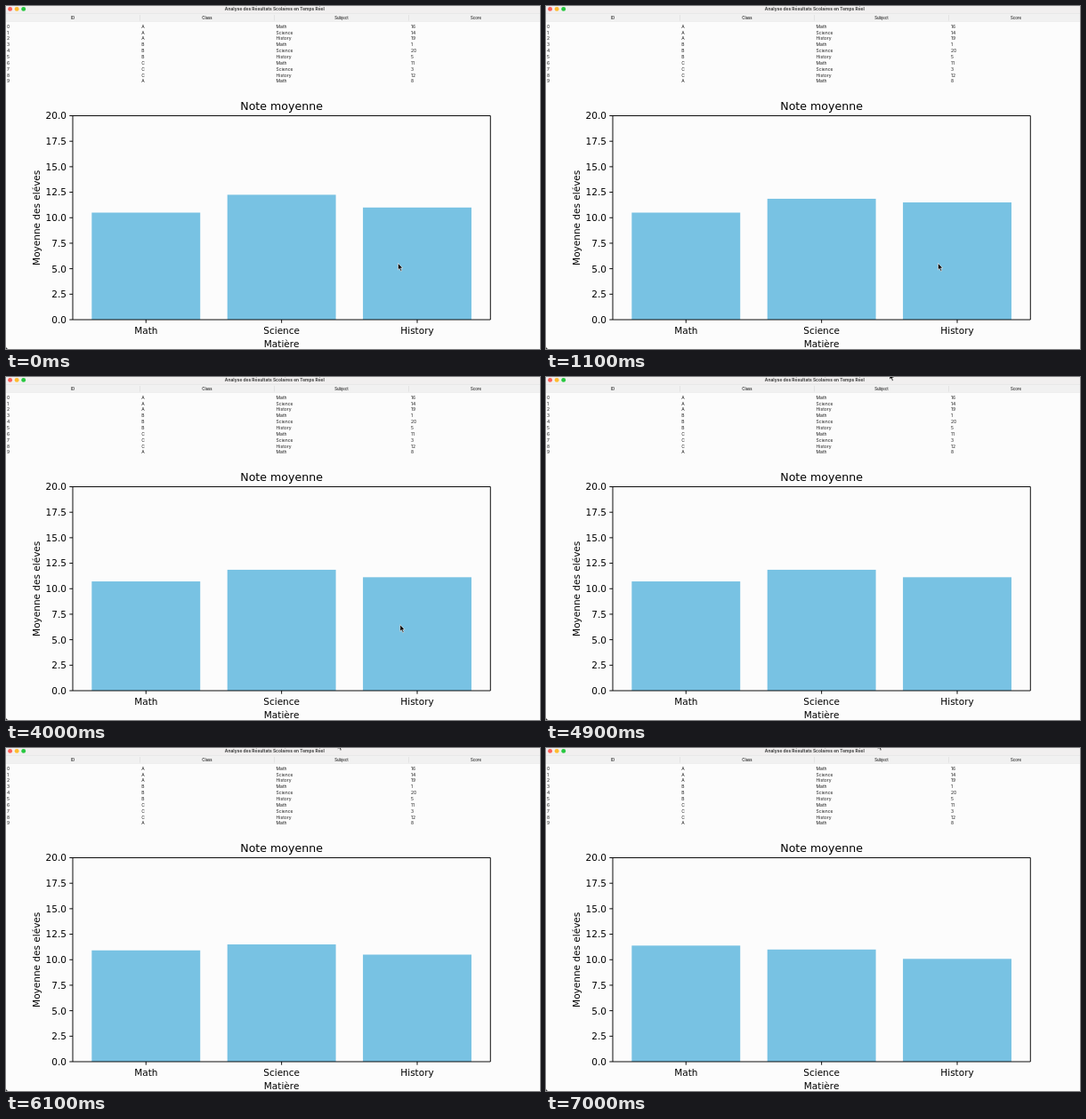
An HTML page for the animation above (7.4 s loop, 600 by 386 pixels).

```html
<!DOCTYPE html>
<html lang="fr">
<head>
<meta charset="utf-8">
<title>Analyse des Résultats Scolaires en Temps Réel</title>
<style>
  html, body { margin: 0; width: 100%; height: 100%; overflow: hidden; background: #fcfcfc; }
  svg { display: block; width: 100%; height: 100%; }
  .ui { font: 5px Inter, sans-serif; fill: #1c1c1c; }
  .head { font-size: 4.3px; font-weight: 500; }
  .title { font-size: 4.9px; font-weight: 700; fill: #404040; }
  .plot { font: 10.5px "DejaVu Sans", sans-serif; fill: #000; }
  .plot-title { font-size: 12.6px; }
  .mid { text-anchor: middle; }
  .end { text-anchor: end; }
  .axis { fill: none; stroke: #000; stroke-width: .95; }
</style>
</head>
<body>
<svg id="stage" viewBox="0 0 600 386"></svg>
<script>
const LOOP = 7400, STEP = 100;
const subjects = ['Math', 'Science', 'History'];
const scores = [16, 14, 19, 1, 20, 5, 11, 3, 12, 8];
const columns = ['ID', 'Class', 'Subject', 'Score'];
const columnWidth = 151;

const plot = { left: 75, right: 544.3, top: 123.5, bottom: 353 };
const unit = (plot.right - plot.left) / 3.08;
const barCentre = i => plot.left + unit * (0.54 + i);
const valueY = v => plot.bottom - v * (plot.bottom - plot.top) / 20;

// Sum and count of the marks per subject when the loop begins
const initial = [[63, 6], [49, 4], [55, 5]];
// New marks: [time, subject index, mark]
const marks = [
  [800, 1, 11], [900, 1, 11], [1000, 2, 14], [1100, 1, 12],
  [1200, 0, 12], [1300, 2, 12], [1400, 2, 8],
  [5400, 0, 12], [5500, 0, 12], [5600, 0, 12], [5700, 0, 11],
  [5800, 1, 9], [5900, 2, 8], [6000, 2, 8], [6100, 0, 9],
  [6200, 2, 5], [6400, 0, 17], [6500, 1, 7], [6600, 2, 11]
];
// Pointer tip: [time, x, y]
const pointerPath = [
  [3900, 440.5, 289.5], [4000, 442.8, 278.8], [4100, 452, 232], [4200, 461, 130],
  [4300, 446, 38], [4400, 412, -3], [4500, 412, -3], [4900, 386, -4.5], [5300, 372.8, -6]
];

const stage = document.getElementById('stage');

function add(tag, attributes, text = '') {
  const node = document.createElementNS('http://www.w3.org/2000/svg', tag);
  for (const name in attributes) node.setAttribute(name, attributes[name]);
  node.textContent = text;
  return stage.appendChild(node);
}
const label = (text, x, y, cls, more) => add('text', { x, y, class: cls, ...more }, text);
const rect = (x, y, width, height, fill) => add('rect', { x, y, width, height, fill });

function drawWindow() {
  rect(0, 0, 600, 386, '#fcfcfc');
  rect(0, 0, 600, 8.5, '#f1efef');
  rect(0, 8.5, 600, 9, '#f1f1f1');
  rect(0, 8.3, 600, .5, '#dcdcdc');
  rect(0, 17.2, 600, .5, '#e4e4e4');
  ['#fe5f57', '#febc2e', '#28c840'].forEach((fill, i) =>
    add('circle', { cx: 4.6 + 7.55 * i, cy: 3.4, r: 2.45, fill }));
  label('Analyse des Résultats Scolaires en Temps Réel', 301.8, 5.1, 'ui title mid');
  add('path', { d: 'M0 383.5Q.3 385.7 2.5 386H0Z', fill: '#222' });
}

function drawTable() {
  columns.forEach((name, i) => {
    label(name, 75 + columnWidth * i, 14.7, 'ui head mid');
    if (i) rect(columnWidth * i - 1, 10, .5, 6.5, '#d4d4d4');
  });
  scores.forEach((score, row) => {
    const cells = [row, 'ABCA'[Math.floor(row / 3)], subjects[row % 3], score];
    cells.forEach((cell, i) => label(cell, 1 + columnWidth * i + i * .3, 24.7 + 6.85 * row, 'ui'));
  });
}

function drawAxes() {
  let d = `M${plot.left} ${plot.top}H${plot.right}V${plot.bottom}H${plot.left}Z`;
  for (let v = 0; v <= 20; v += 2.5) {
    const y = valueY(v);
    d += `M${plot.left} ${y}h-3.7`;
    label(v.toFixed(1), plot.left - 7, y + 3.9, 'plot end');
  }
  subjects.forEach((name, i) => {
    d += `M${barCentre(i)} ${plot.bottom}v3.7`;
    label(name, barCentre(i), 369, 'plot mid');
  });
  add('path', { d, class: 'axis' });
  label('Note moyenne', 309.6, 117, 'plot plot-title mid');
  label('Matière', 309.6, 383.8, 'plot mid');
  label('Moyenne des eléves', 0, 0, 'plot mid', { transform: 'translate(37.7 238.3) rotate(-90)' });
}

drawWindow();
drawTable();
const bars = subjects.map((_, i) => rect(barCentre(i) - unit * .4, 0, unit * .8, 0, '#78c2e3'));
drawAxes();
const pointer = add('path', {
  d: 'M0 0V7.4L1.7 5.9L3 8.9L4.3 8.3L3 5.4H5.2Z',
  fill: '#000', stroke: '#fff', 'stroke-width': .6, 'stroke-linejoin': 'round'
});

function pointerAt(time) {
  const next = pointerPath.findIndex(p => p[0] > time);
  if (next === 0) return pointerPath[0].slice(1);
  if (next < 0) return pointerPath.at(-1).slice(1);
  const [t0, x0, y0] = pointerPath[next - 1], [t1, x1, y1] = pointerPath[next];
  const k = (time - t0) / (t1 - t0);
  return [x0 + (x1 - x0) * k, y0 + (y1 - y0) * k];
}

function render(now) {
  const time = Math.floor(now % LOOP / STEP) * STEP;
  const totals = initial.map(pair => [...pair]);
  for (const [at, subject, mark] of marks) {
    if (at > time) break;
    totals[subject][0] += mark;
    totals[subject][1]++;
  }
  totals.forEach(([sum, count], i) => {
    const y = valueY(sum / count);
    bars[i].setAttribute('y', y);
    bars[i].setAttribute('height', plot.bottom - y);
  });
  pointer.setAttribute('transform', `translate(${pointerAt(time)})`);
}

const start = performance.now();
function tick() {
  render(performance.now() - start);
  requestAnimationFrame(tick);
}
tick();
</script>
</body>
</html>
```
